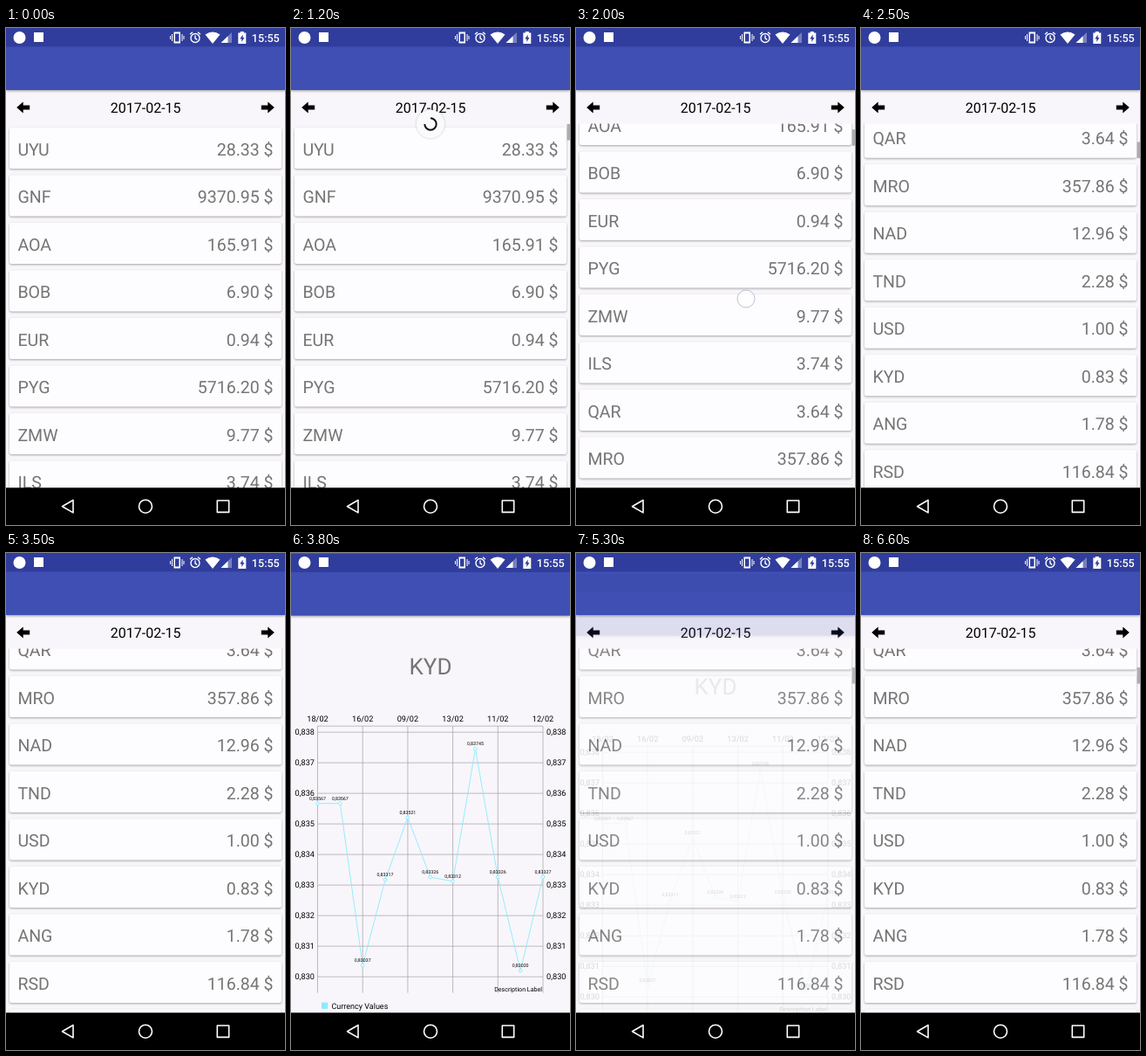
An HTML page for the animation above (6.7 s loop, 320 by 569 pixels).

```html
<!DOCTYPE html>
<html lang="en">
<head>
<meta charset="utf-8">
<title>Currency rates</title>
<style>
html, body { margin: 0; width: 100%; height: 100%; overflow: hidden; background: #000; }
svg { display: block; width: 100vw; height: 100vh; font-family: Roboto, "Liberation Sans", sans-serif; text-rendering: geometricPrecision; }
.row { font-size: 19.56px; fill: #757575; }
.end { text-anchor: end; }
.mid { text-anchor: middle; }
.axis { font-size: 9.2px; }
.value { font-size: 5.3px; text-anchor: middle; }
.card { fill: #fdfcfe; filter: drop-shadow(0 1px .9px rgba(0, 0, 0, .34)); }
.grid { stroke: #a3a1a5; stroke-width: .7; fill: none; }
.raised { filter: drop-shadow(0 1px 1.5px rgba(0, 0, 0, .4)); }
.disc { fill: #faf9fc; filter: drop-shadow(0 .6px 1.2px rgba(0, 0, 0, .24)); }
</style>
</head>
<body>
<svg viewBox="0 0 320 569" xmlns="http://www.w3.org/2000/svg">
  <defs>
    <clipPath id="screen"><rect width="320" height="527"/></clipPath>
    <clipPath id="body"><rect y="71" width="320" height="456"/></clipPath>
    <clipPath id="listArea"><rect y="109.5" width="320" height="417.5"/></clipPath>
    <radialGradient id="glow">
      <stop offset="0" stop-color="#fff" stop-opacity=".9"/>
      <stop offset=".45" stop-color="#fff" stop-opacity=".7"/>
      <stop offset="1" stop-color="#fff" stop-opacity=".4"/>
    </radialGradient>
    <g id="bar" class="raised">
      <rect width="320" height="71" fill="#3f4fb3"/>
      <rect width="320" height="21.4" fill="#303d9c"/>
    </g>
    <path id="arrow" d="M0 0L7.5 -6.6V-2.6H15V2.6H7.5V6.6Z"/>
  </defs>

  <g clip-path="url(#screen)">
    <rect width="320" height="527" fill="#f8f6fa"/>
    <g clip-path="url(#listArea)"><g id="list"></g></g>
    <use href="#arrow" x="12.2" y="91"/>
    <use href="#arrow" transform="translate(307.8 91) scale(-1 1)"/>
    <text class="mid" x="160.2" y="97" font-size="16">2017-02-15</text>
    <rect id="thumb" x="316.5" width="3.5" height="18.5" fill="#aeacb0"/>
    <g clip-path="url(#body)">
      <g id="spinner">
        <circle class="disc" r="16.2"/>
        <path id="arc" fill="none" stroke="#111" stroke-width="2"/>
      </g>
    </g>
    <use href="#bar"/>
    <g id="detail">
      <rect width="320" height="527" fill="#f8f6fa"/>
      <use href="#bar"/>
      <text class="mid" x="160" y="138.3" font-size="26" fill="#757575">KYD</text>
      <g id="chart"></g>
    </g>
  </g>

  <g fill="#fff">
    <circle cx="15.5" cy="11" r="7"/>
    <rect x="32" y="5" width="11" height="11"/>
    <path d="M192.5 4.5h7.5v13h-7.5zM190 7h1v8h-1zM188 9h1v4h-1zM201.5 7h1v8h-1zM203.5 9h1v4h-1z"/>
    <path d="M194 6.5h4.5v9h-4.5z" fill="#303d9c"/>
    <g fill="none" stroke="#fff" stroke-width="1.4">
      <circle cx="217" cy="11.5" r="5"/>
      <path d="M217 8.5v3.3l2.3 1.5M211 7.3l3 -2.6M223 7.3l-3 -2.6"/>
    </g>
    <path d="M228.5 7.5Q237 1.5 245.5 7.5L237 18Z"/>
    <path d="M259 5V17H246.5Z" opacity=".35"/>
    <path d="M254.5 9.3V17H246.5Z"/>
    <path d="M266.3 5.5h2.5v-1.5h4v1.5h2.5v12.5h-9z"/>
    <path d="M271.6 7.5l-3.3 5h2v3.5l3.2 -5h-1.9z" fill="#303d9c"/>
    <text class="end" x="313.8" y="15.5" font-size="12.6" font-weight="500">15:55</text>
  </g>

  <rect y="526.3" width="320" height="42.7" fill="#000"/>
  <g fill="none" stroke="#fff" stroke-width="1.6" stroke-linejoin="round">
    <path d="M64.5 547.7L77 540.5V554.9Z"/>
    <circle cx="160" cy="547.7" r="7.5"/>
    <rect x="242.3" y="541" width="13.4" height="13.4"/>
  </g>
  <circle id="touch" r="10" fill="url(#glow)" stroke="#aaa5c8" stroke-opacity=".7"/>
</svg>
<script>
const LOOP = 6700, STEP = 100, PITCH = 54.5;
const rates = [
  "UYU 28.33", "GNF 9370.95", "AOA 165.91", "BOB 6.90", "EUR 0.94", "PYG 5716.20",
  "ZMW 9.77", "ILS 3.74", "QAR 3.64", "MRO 357.86", "NAD 12.96", "TND 2.28",
  "USD 1.00", "KYD 0.83", "ANG 1.78", "RSD 116.84", ""
];
const history = [83567, 83567, 83037, 83317, 83521, 83326, 83312, 83745, 83326, 83020, 83327];
const dates = ["18/02", "16/02", "09/02", "13/02", "11/02", "12/02"];

// Keyframes as [time, value] pairs
const pull = [[600, 57], [800, 94], [1000, 126], [1100, 130], [1200, 110]];
const scroll = [[1700, 0], [1800, 14], [1900, 70], [2000, 136], [2100, 225], [2200, 304],
  [2300, 370], [2400, 418], [2500, 448.3], [2600, 458], [2700, 462], [2800, 463.5]];

const $ = id => document.getElementById(id);
const clamp = v => Math.max(0, Math.min(1, v));
const ramp = (t, from, to) => clamp((t - from) / (to - from));
const easeOut = p => 1 - (1 - p) ** 3;

function track(keys, t) {
  if (t <= keys[0][0]) return keys[0][1];
  for (let i = 1; i < keys.length; i++) {
    const [a, va] = keys[i - 1], [b, vb] = keys[i];
    if (t <= b) return va + (vb - va) * (t - a) / (b - a);
  }
  return keys[keys.length - 1][1];
}

function set(id, attrs) {
  for (const k in attrs) $(id).setAttribute(k, attrs[k]);
}

function buildList() {
  $("list").innerHTML = rates.map((rate, i) => {
    const [code, price] = rate.split(" ");
    const y = i * PITCH;
    const card = `<rect class="card" x="4" y="${113.8 + y}" width="312" height="47.3" rx="2.5"/>`;
    return !code ? card : card +
      `<text class="row" x="13.4" y="${145.7 + y}">${code}</text>` +
      `<text class="row end" x="306.6" y="${145.7 + y}">${price} $</text>`;
  }).join("");
}

function buildChart() {
  const px = i => 30.5 + 25.85 * i;
  const py = v => 204.5 + (83800 - v) * .35;
  let grid = "M30.5 197.5H289", labels = "", marks = "";
  dates.forEach((d, i) => {
    const x = px(i * 2);
    grid += `M${x} 197.5V503`;
    labels += `<text class="axis mid" x="${x}" y="192.5">${d}</text>`;
  });
  for (let v = 830; v <= 838; v++) {
    const y = py(v * 100);
    grid += `M30.5 ${y}H289`;
    labels += `<text class="axis end" x="27" y="${y + 3.2}">0,${v}</text>` +
      `<text class="axis" x="293" y="${y + 3.2}">0,${v}</text>`;
  }
  history.forEach((v, i) => {
    marks += `<circle cx="${px(i)}" cy="${py(v)}" r="1.8" fill="#fff" stroke="#8ceaff"/>` +
      `<text class="value" x="${px(i)}" y="${py(v) - 4}">0,${v}</text>`;
  });
  const line = history.map((v, i) => px(i) + "," + py(v)).join(" ");
  $("chart").innerHTML = `<path class="grid" d="${grid}"/>${labels}` +
    `<polyline points="${line}" fill="none" stroke="#8ceaff" stroke-width=".9"/>${marks}` +
    `<text class="end" x="288" y="501.5" font-size="7.1">Description Label</text>` +
    `<rect x="35" y="514" width="7.2" height="7.2" fill="#8ceaff"/>` +
    `<text x="46.5" y="521" font-size="9">Currency Values</text>`;
}

function arcPath(start, sweep, r) {
  const at = a => (r * Math.cos(a)).toFixed(2) + " " + (r * Math.sin(a)).toFixed(2);
  return `M${at(start)}A${r} ${r} 0 ${sweep > Math.PI ? 1 : 0} 1 ${at(start + sweep)}`;
}

function drawSpinner(t) {
  const shown = t >= 600 && t < 1600;
  const spin = Math.max(0, t - 1200) / 1000;
  const size = 1 - ramp(t, 1400, 1600);
  set("spinner", {
    visibility: shown ? "visible" : "hidden",
    transform: `translate(160 ${track(pull, t)}) scale(${size})`
  });
  set("arc", {
    d: arcPath(-Math.PI / 2 + spin * 7, 4.7 * ramp(t, 500, 1000) - spin * 3, 6.7),
    opacity: t < 1000 ? .35 : 1
  });
}

function touchPoint(t) {
  if (t >= 600 && t < 1200) return [190, 200 + 200 * easeOut(ramp(t, 600, 1100))];
  if (t >= 1800 && t < 2200) return [195, 446 - track(scroll, t)];
  if (t >= 3300 && t < 3500) return [200, 384];
  if (t >= 4900 && t < 5100) return [85, 556];
  return null;
}

function thumbAlpha(t) {
  if (t >= 5200) return 1;
  if (t >= 1800) return 1 - ramp(t, 3100, 3400);
  return t < 700 ? 0 : 1 - ramp(t, 1400, 1600);
}

function render(t) {
  const offset = track(scroll, t);
  set("list", { transform: `translate(0 ${-offset})` });
  set("thumb", { y: 110 + offset * .0455, opacity: thumbAlpha(t) });
  drawSpinner(t);

  const enter = easeOut(ramp(t, 3500, 3900)), leave = ramp(t, 5000, 5400);
  set("detail", {
    opacity: ramp(t, 3500, 3750) * (1 - ramp(t, 5000, 5350)),
    transform: `translate(0 ${42 * (1 - enter + leave * leave)})`
  });

  const p = touchPoint(t);
  set("touch", { visibility: p ? "visible" : "hidden" });
  if (p) set("touch", { cx: p[0], cy: p[1] });
}

buildList();
buildChart();
const start = performance.now();
function tick() {
  const t = (performance.now() - start) % LOOP;
  render(Math.floor(t / STEP) * STEP);
  requestAnimationFrame(tick);
}
tick();
</script>
</body>
</html>
```
